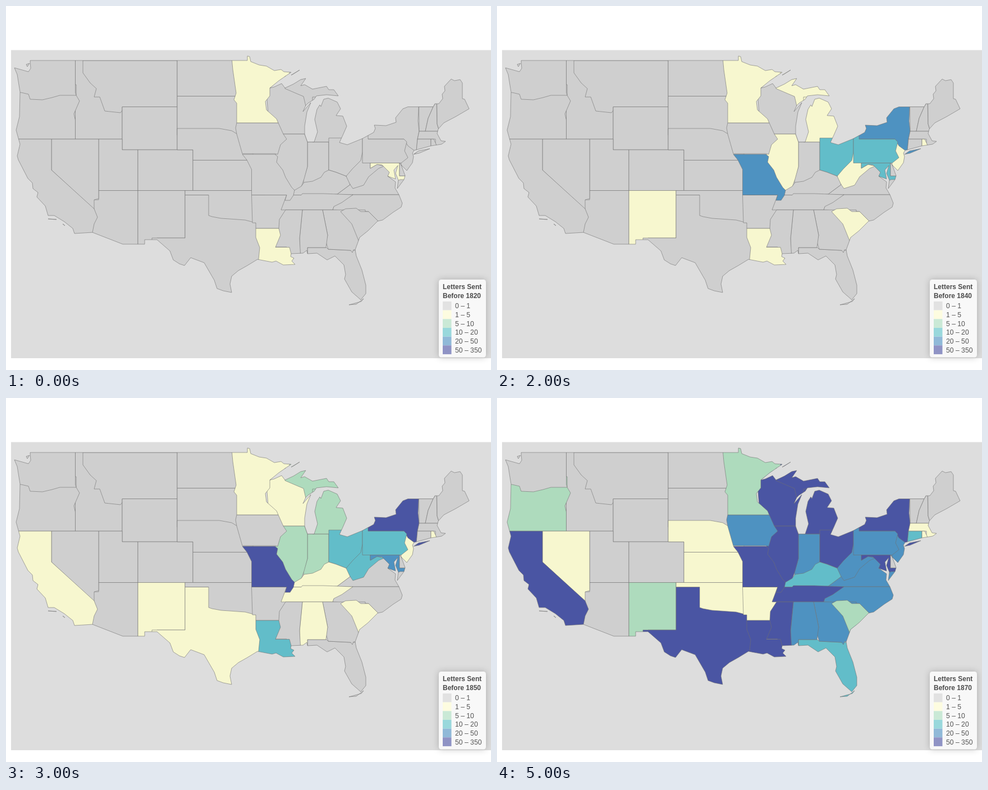
Recreate the animation shown at these times as an HTML page. Size 864 px wide and 648 px high, loop 6 s.

```html
<!DOCTYPE html>
<html lang="en">
<head>
<meta charset="utf-8">
<title>Letters sent by decade</title>
<style>
  html, body { margin: 0; width: 100%; height: 100%; overflow: hidden; background: #fff; }
  svg { display: block; width: 864px; height: 648px; }
  #states, #outline { fill: #cfcfcf; stroke: #707070; stroke-opacity: .7; stroke-width: .85; stroke-linejoin: round; }
  #outline { fill: none; }
  #legend { font: 12.2px "Liberation Sans", Arial, sans-serif; fill: #555; }
  #legend .title { font-size: 12px; font-weight: bold; fill: #4c4c4c; }
  #panel { fill: #f8f8f8; filter: drop-shadow(0 0 6px rgba(0, 0, 0, .22)); }
</style>
</head>
<body>
<svg viewBox="0 0 864 648">
  <clipPath id="land"><path id="shore"/></clipPath>
  <rect x="9" y="78.5" width="855" height="548.5" fill="#ddd"/>
  <!-- Rough shapes: the coast clips them, and later states cover the edges of earlier ones. -->
  <g id="states" clip-path="url(#land)">
    <path d="M100 90V97H305V179.5H207V200H100Z"/>
    <path d="M123.5 90H137V119L150 137 161 147 157 162 167 162 176 187 204 190 207 186V237H123.5Z"/>
    <path data-levels="000002" d="M0 237H123.5V203L121 192 131 169 125 159V140H0Z"/>
    <path d="M0 90H123.5V154L125 159H96L82 163 65 167 43 166 40 157 27 154H0Z"/>
    <path d="M207 179.5H305V256H207Z"/>
    <path d="M165 237H207V256H235V328.5H165Z"/>
    <path d="M235 256H333V328.5H235Z"/>
    <path d="M165 328.5H235V430H150V345H165Z"/>
    <path data-levels="000011" d="M81 237H165V343L157 345V362L81 292Z"/>
    <path data-levels="000145" d="M0 237H81V292L157 361 163 376 157 388 154 403V410H0Z"/>
    <path data-levels="001122" d="M235 328.5H319V413H269V430H235Z"/>
    <path d="M305 90H420V160.5H305Z"/>
    <path d="M305 160.5H420V230H305Z"/>
    <path data-levels="000011" d="M305 218H380L402 222 412 228H440V274.5H333V256H305Z"/>
    <path data-levels="000011" d="M333 274.5H450V328.5H333Z"/>
    <path data-levels="000145" d="M319 336.5H460V520H260V413H319Z"/>
    <path data-levels="000011" d="M319 328.5H445V386L426 381 398 379 383 378 367 375 361 373V336.5H319Z"/>
    <path data-levels="000001" d="M437.5 336.5H520V396H445V386H439Z"/>
    <path data-levels="000145" d="M462 130H545V228H470Z"/>
    <path data-levels="000224" d="M537 242H575V320H530V308L537 286Z"/>
    <path data-levels="001245" d="M480 228H532L537 242V286L531 308 526 322 514 335H480Z"/>
    <path data-levels="000044" d="M411 208H485L494 228 500 237 489 247 484 264 479 263H421L411 228 409 217Z"/>
    <path data-levels="111122" d="M401 80H510V118L484 137 470 146V160L462 170 464 185 482 201 485 208H411V173L406 167 410 155 404 113Z"/>
    <path data-levels="001245" d="M497 125H600V162H556L534 178 530 161 518 156 497 147ZM546 162H615V243L575 242H546ZM505 110H525V124H505Z"/>
    <path data-levels="000034" d="M590 335L613 318 650 270H715V336H590Z"/>
    <path data-levels="001334" d="M600 260H649V289L661 282 674 285 664 289 646 304 637 319 618 325 607 309Z"/>
    <path data-levels="003345" d="M575 235H635V260L632 275 617 290 606 303 588 296 575 292Z"/>
    <path data-levels="000123" d="M500 337L514 328 526 321 531 314 546 312 561 305 567 296 575 292 588 296 606 303 613 318 590 335 565 337Z"/>
    <path data-levels="000044" d="M618 336H715V390H670L646 366 582 363 584 355Z"/>
    <path data-levels="000125" d="M500 336.5H526L528 334H565L618 336 598 350 584 357 582 363H490Z"/>
    <path data-levels="000003" d="M537 430H571L574 433 614 435H660V540H537Z"/>
    <path data-levels="000014" d="M564 363H640V434H619L617 439 614 435 574 433 570 420 573 408Z"/>
    <path data-levels="011112" d="M596 366L605 361 624 360 632 366H646L670 390V420H629L616 388Z"/>
    <path data-levels="000114" d="M528 363H564L573 408 570 430H537V450H524L523 414Z"/>
    <path data-levels="000015" d="M498 363H528L523 414 525 450H500V429H475L486 396 487 380Z"/>
    <path data-levels="111345" d="M445 396H486L489 408 480 429.5H505L508 441 525 470H448L452 430 445 412Z"/>
    <path data-levels="004555" d="M421 264H479L484 268 482 278 493 292 498 305 509 323 514 328 512 337 506 346H497L500 336.5H437.5V291L429 274Z"/>
    <path data-levels="001134" d="M700 240H730V300H714L704 283Z"/>
    <path data-levels="024555" d="M635 237V170H735.5L734 205 736 223 733 237 731 260 716 249 709 237ZM726 265L735 257 756 253V265Z"/>
    <path data-levels="023344" d="M635 225H645V237H709L714 242 710 258 716 270 704 279.5H635Z"/>
    <path data-levels="123445" d="M649 279.5H701V302.5H720V309H702L696 312 680 303 683 296 670 283 661 282 649 289Z"/>
    <path d="M701 279.5L704 283 712 296V302.5H701Z"/>
    <path d="M735.5 179.5H761L752 200 747 223H736Z"/>
    <path d="M761 179.5L767 170 768 210 772 223H747L752 200Z"/>
    <path d="M767 120H830V223H772L768 210Z"/>
    <path data-levels="000001" d="M736 223H790V250H765V237H733Z"/>
    <path data-levels="000033" d="M733 237H757V253L731 258Z"/>
    <path data-levels="011111" d="M757 237H762L768 250H757Z"/>
  </g>
  <path id="outline"/>
  <g id="legend">
    <rect id="panel" x="771" y="487" width="84" height="138.5" rx="4.5"/>
    <text class="title" x="778" y="504">Letters Sent</text>
    <text class="title" x="778" y="520" id="decade"></text>
  </g>
</svg>
<script>
const FILLS = ['#cfcfcf', '#f7f7cf', '#aedbbd', '#62bdc9', '#4e92c1', '#4a55a3'];
const LEGEND = [
  ['#e2e2e2', '0 – 1'], ['#fdfce0', '1 – 5'], ['#cae9d6', '5 – 10'],
  ['#99d8dc', '10 – 20'], ['#90b9d8', '20 – 50'], ['#8f93c5', '50 – 350']
];

// The coast, clockwise from the north-west corner.
const north = 'M43 97H430V89L434 90 436 99 451 105 464 107 478 115 490 113 495 117 508 118 486 133 470 146';
const lakes = 'L478 144 491 138 497 146 512 139 525 131 534 129 525 142 532 140 546 148 571 143 575 149 584 149 592 160 571 158 553 160 549 166 538 173 534 177 529 188 543 172 536 189 532 214 532 228 537 242H549L555 224 550 202 554 184 559 176 561 179 566 166 574 164 590 171 596 183 588 195 600 196 607 214 600 230 594 243 608 247 635 236 655 225 658 218 656 212 677 213 695 207 694 199 707 183 716 179.5';
const newEngland = 'H761L764 174 771 174 778 165 777 157 782 151 781 143 793 130 799 133 809 131 813 137V165L817 166 825 183 801 197 780 208 770 219 768 227 775 240 783 241 776 246 757 249 731 256 727 257';
const atlantic = 'L724 262 726 268 724 279 714 293 704 283 711 302 709 309 697 325 699 310 694 298 698 284 691 292 694 308 680 303 694 313 693 324 700 336 706 351 704 358 690 367 671 381 662 383 645 400 630 412 622 434 624 445 634 470 641 497 641 512 632 523';
const gulf = 'L616 509 603 486 605 478 602 461 586 445 572 452 554 440 537 441 536 435 529 440 508 441 507 446 513 449 509 454 515 460 494 461 481 454 474 456 448 451 430 462 414 471 402 481 399 495 402 510';
const south = 'L387 507 376 503 371 488 353 457 329 448 318 462 309 459 298 452 292 436 269 416H247V424H208L154 403 122 405';
const pacific = 'L119 396 104 384 86 373 75 373 70 356 55 340 57 332 48 325 47 315 39 307 22 274 20 267 25 246 18 221 24 197 25 153 20 122 15 110 40 117 44 111Z';
const islands = 'M726 264L735 258 755 254 736 262ZM508 123L523 114 512 121ZM611 532L633 526 637 521 624 531ZM75 379L90 380ZM101 388L105 391ZM36 104L42 102 38 108Z';
const coast = north + lakes + newEngland + atlantic + gulf + south + pacific + islands;
for (const id of ['shore', 'outline']) document.getElementById(id).setAttribute('d', coast);

function addToLegend(tag, attributes, text = '') {
  const node = document.createElementNS('http://www.w3.org/2000/svg', tag);
  for (const [name, value] of Object.entries(attributes)) node.setAttribute(name, value);
  node.textContent = text;
  document.getElementById('legend').append(node);
}

LEGEND.forEach(([fill, label], i) => {
  const y = 526 + i * 15.65;
  addToLegend('rect', { x: 778, y, width: 15.5, height: 15.65, fill });
  addToLegend('text', { x: 800, y: y + 12.3 }, label);
});

const tinted = document.querySelectorAll('[data-levels]');
const decadeLabel = document.getElementById('decade');
const start = performance.now();
let shown = -1;

function draw(now) {
  const step = Math.floor(Math.max(0, now - start) / 1000) % 6;
  if (step !== shown) {
    shown = step;
    decadeLabel.textContent = `Before ${1820 + step * 10}`;
    for (const state of tinted) state.setAttribute('fill', FILLS[state.dataset.levels[step]]);
  }
  requestAnimationFrame(draw);
}
draw(start);
</script>
</body>
</html>
```
